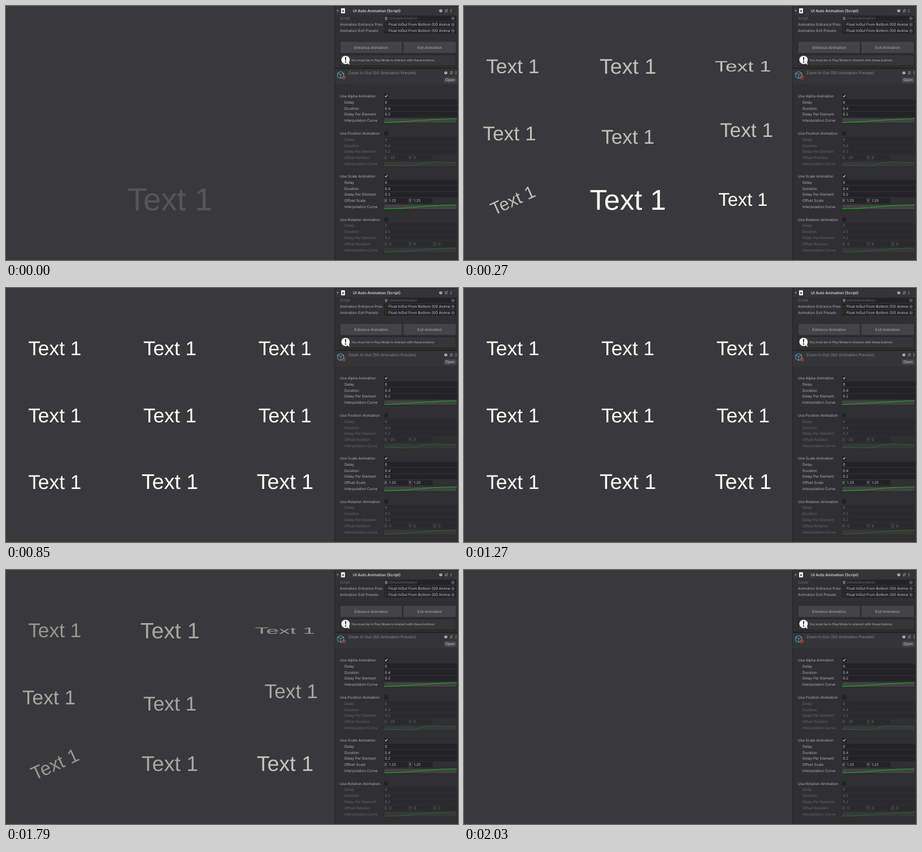
Write an HTML page that moves like this. It is 800 by 450 pixels and loops after 2.33 s.

```html
<!DOCTYPE html>
<html lang="en">
<head>
<meta charset="utf-8">
<title>UI Auto Animation</title>
<style>
  html, body { margin: 0; width: 100%; height: 100%; overflow: hidden; background: #39383a; }
  svg { display: block; width: 100%; height: 100%; }
  text { white-space: pre; text-rendering: geometricPrecision; }
  #panel text { font-family: Inter, sans-serif; font-size: 6.46px; fill: #b4b3b5; }
  #panel .dim { opacity: .42; }
  #stage text { font: 35.3px "Liberation Sans", Arial, sans-serif; fill: #fff; text-anchor: middle; }
</style>
</head>
<body>
<svg id="root" viewBox="0 0 800 450">
  <defs>
    <clipPath id="labelClip"><rect x="582" y="0" width="84.5" height="450"/></clipPath>
    <clipPath id="fieldClip"><rect x="669" y="0" width="117" height="450"/></clipPath>
  </defs>
  <rect width="800" height="450" fill="#39383a"/>
  <g id="stage"></g>
  <g id="panel"></g>
</svg>
<script>
const NS = 'http://www.w3.org/2000/svg';
const panel = document.getElementById('panel');
const stage = document.getElementById('stage');

function add(parent, tag, attrs, content) {
  const el = document.createElementNS(NS, tag);
  for (const k in attrs) el.setAttribute(k, attrs[k]);
  if (content !== undefined) el.textContent = content;
  return parent.appendChild(el);
}
const rect = (g, x, y, w, h, fill, more) =>
  add(g, 'rect', { x, y, width: w, height: h, fill, ...more });
const path = (g, d, stroke, width = 1, fill = 'none') =>
  add(g, 'path', { d, stroke, 'stroke-width': width, fill });
const label = (g, x, mid, str, style = '', more = {}) =>
  add(g, 'text', { x, y: mid + 2.3, style, ...more }, str);

// ---- Inspector panel ----
const PANEL = '#302f31', HEAD = '#353436', FIELD = '#232224', EDGE = '#1e1d1f';

function headerIcons(x, y) {
  add(panel, 'circle', { cx: x, cy: y, r: 2.6, fill: '#c4c3c5' });
  label(panel, x, y - .4, '?', 'font-size:5px;font-weight:700;fill:#333;text-anchor:middle');
  path(panel, `M${x + 7} ${y - 1.4}h5.4M${x + 7} ${y + 1.6}h5.4M${x + 11} ${y - 2.8}v2.8M${x + 8.6} ${y + .2}v2.8`, '#a4a3a5', .8);
  for (const d of [-2.2, 0, 2.2])
    add(panel, 'circle', { cx: x + 18, cy: y + d, r: .7, fill: '#c4c3c5' });
}

function objectRow(mid, name, value, dim) {
  const row = add(panel, 'g', {});
  rect(row, 669, mid - 4.6, 128, 9.2, FIELD, { rx: 1 });
  const ink = add(row, 'g', dim ? { opacity: .5 } : {});
  label(ink, 591, mid, name, '', { 'clip-path': 'url(#labelClip)' });
  label(ink, 677, mid, value, dim ? '' : 'fill:#d0cfd1', { 'clip-path': 'url(#fieldClip)' });
  if (dim) rect(ink, 670.5, mid - 3, 4.6, 6, '#b0afb1', { rx: .6 });
  else path(ink, `M671 ${mid - 1.5}l1.8 -1 1.8 1v2.4l-1.8 1-1.8 -1z`, '#454', .6);
  add(row, 'circle', { cx: 791, cy: mid, r: 2.5, fill: 'none', stroke: '#8a898b', 'stroke-width': .8 });
  add(row, 'circle', { cx: 791, cy: mid, r: 1, fill: '#8a898b' });
}

function button(x, y, w, h, str) {
  rect(panel, x, y, w, h, '#444345', { rx: 1, stroke: '#29282a', 'stroke-width': .6 });
  label(panel, x + w / 2, y + h / 2, str, 'text-anchor:middle');
}

function buildHeader() {
  rect(panel, 582, 0, 218, 450, PANEL);
  rect(panel, 582, 0, 218, 16, HEAD);
  rect(panel, 581, 0, 1.6, 450, '#272628');
  rect(panel, 582, 0, 218, .8, '#242325');
  path(panel, 'M584.8 7h4.4l-2.2 3.4z', 'none', 0, '#7b7a7c');
  rect(panel, 593, 4, 7, 9, '#eeedef', { rx: 1 });
  label(panel, 596.5, 8.4, '#', 'font-size:5.5px;font-weight:700;fill:#333;text-anchor:middle');
  label(panel, 614, 8.4, 'UI Auto Animation (Script)', 'font-size:6.7px;font-weight:600;fill:#d4d3d5');
  headerIcons(769.5, 8.3);

  objectRow(22, 'Script', 'UIAutoAnimation', true);
  objectRow(33, 'Animation Entrance Presets', 'Float InOut From Bottom (SO Animation Presets)');
  objectRow(44, 'Animation Exit Presets', 'Float InOut From Bottom (SO Animation Presets)');

  button(591.5, 63, 109.5, 20.5, 'Entrance Animation');
  button(703, 63, 93.5, 20.5, 'Exit Animation');

  rect(panel, 591.5, 86.3, 205, 19.8, '#363537', { rx: 1, stroke: EDGE, 'stroke-width': .8 });
  path(panel, 'M604 101l4 3.6 -1 -6z', 'none', 0, '#fff');
  add(panel, 'circle', { cx: 601, cy: 95.6, r: 7.4, fill: '#fff' });
  path(panel, 'M599.9 90.4h2.4l-.5 6.6h-1.4z', 'none', 0, '#2c2b2d');
  add(panel, 'circle', { cx: 601.1, cy: 99.3, r: 1.2, fill: '#2c2b2d' });
  label(panel, 611, 96, 'You must be in Play Mode to interact with these buttons', 'font-size:5.6px');

  rect(panel, 582, 109.6, 218, 2, '#1f1e20');
  rect(panel, 582, 111.6, 218, 27.4, HEAD);
  path(panel, 'M592.3 116.2l5.4 2.7v6.6l-5.4 2.9 -5.4 -2.9v-6.6zM586.9 118.9l5.4 2.7 5.4 -2.7M592.3 121.6v6.8', '#5ba9cf', 1);
  label(panel, 598, 126.6, '{}', 'font-size:7.5px;font-weight:700;fill:#d85a38;text-anchor:middle');
  label(panel, 605.7, 118.4, 'Zoom In Out (SO Animation Presets)', 'font-size:7.07px;fill:#8a898b');
  headerIcons(778.5, 118.3);
  rect(panel, 775, 126.5, 22, 9.4, '#484749', { rx: 1 });
  label(panel, 786, 131.1, 'Open', 'fill:#cccbcd;text-anchor:middle');
}

const STEP = 10.85;

// Curve shapes in a 129 by 9 box.
const CURVES = {
  ramp: 'M0 8.2C40 6.6 80 2.6 129 .8',
  dip: 'M0 6.6C22 7 30 8.2 46 8C64 7.4 66 1 86 .9C102 .9 112 1.6 129 2',
  ease: 'M0 8C48 7.8 78 .9 129 .9'
};

function section(top, name, on, delays, curve, vector) {
  label(panel, 591, top, `Use ${name} Animation`);
  rect(panel, 669.3, top - 3.8, 7.4, 7.6, FIELD, { rx: 1 });
  if (on) path(panel, `M670.8 ${top}l1.5 1.7 2.6 -3.6`, '#dddcde', 1.1);

  const body = add(panel, 'g', on ? {} : { class: 'dim' });
  let mid = top + STEP;
  const fieldNames = ['Delay', 'Duration', 'Delay Per Element'];
  fieldNames.forEach((str, i) => {
    label(body, 599, mid, str);
    rect(body, 669, mid - 4.6, 130, 9.3, FIELD, { rx: 1 });
    label(body, 670.5, mid, delays[i], 'fill:#c4c3c5');
    mid += STEP;
  });
  if (vector) {
    label(body, 599, mid, `Offset ${name}`);
    vector.forEach((v, i) => {
      const x = 669.5 + i * 43.5;
      label(body, x, mid, 'XYZ'[i]);
      rect(body, x + 7, mid - 4.6, 35, 9.3, FIELD, { rx: 1 });
      label(body, x + 8.5, mid, v, 'fill:#c4c3c5');
    });
    mid += STEP;
  }
  label(body, 599, mid, 'Interpolation Curve');
  const box = add(body, 'g', { transform: `translate(669 ${mid - 4.4})` });
  rect(box, 0, 0, 129, 9, '#434244', { stroke: EDGE, 'stroke-width': .6 });
  path(box, CURVES[curve], '#16b819', 1);
}

buildHeader();
section(159.5, 'Alpha', true, ['0', '0.4', '0.2'], 'ramp');
section(225.5, 'Position', false, ['0', '0.4', '0.2'], 'dip', ['-25', '0']);
section(301.5, 'Scale', true, ['0', '0.4', '0.2'], 'ease', ['1.25', '1.25']);
section(378.2, 'Rotation', false, ['0', '0.5', '0.2'], 'ease', ['0', '0', '0']);

// ---- Animated texts ----
const LOOP = 2330;
const clamp = v => Math.min(1, Math.max(0, v));
const ramp = (t, start, dur) => clamp((t - start) / dur);
const ease = u => u * u * (3 - 2 * u);

// Pose offsets: x, y shift; w, h added scale; a angle in degrees.
const still = {};
const zoom = { w: .27, h: .27 };
const flip = { w: .25, h: -1 };
const EARLY = [1580, 400], LATE = [1625, 375], LAST = [1690, 335];

function cell(col, row, from, to, exit, more) {
  const el = add(stage, 'text', { y: 12.2 }, 'Text 1');
  return {
    el, from, to, exit,
    cx: 86.3 + col * 203.8, cy: [107, 226, 344][row],
    fade: [20, 370], move: 400, size: 1, ...more
  };
}

const cells = [
  cell(0, 0, still, still, EARLY),
  cell(1, 0, zoom, zoom, LATE),
  cell(2, 0, flip, flip, EARLY),
  cell(0, 1, { x: -24 }, { x: -25 }, LATE),
  cell(1, 1, { y: 23.5 }, { y: 27 }, LATE),
  cell(2, 1, { x: 25, y: -25 }, { x: 26, y: -26 }, LATE),
  cell(0, 2, { a: -56, w: -.27, h: -.27 }, { a: -45, w: -.1, h: -.1 }, EARLY, { move: 500 }),
  cell(1, 2, { w: .5, h: .5 }, still, LATE, { fade: [-28, 200], move: 740, size: 1.065, cy: 343 }),
  cell(2, 2, { w: -.3, h: -.3 }, still, LAST, { fade: [20, 200], move: 500, size: 1.065, cy: 343 })
];

function draw(t) {
  for (const c of cells) {
    const out = ramp(t, ...c.exit);
    const left = 1 - ease(ramp(t, 0, c.move)), gone = ease(out);
    const mix = k => (c.from[k] || 0) * left + (c.to[k] || 0) * gone;
    const sx = c.size * (1 + mix('w')), sy = c.size * (1 + mix('h'));
    c.el.setAttribute('transform',
      `translate(${c.cx + mix('x')} ${c.cy + mix('y')}) rotate(${mix('a')}) scale(${sx} ${sy})`);
    c.el.setAttribute('opacity', Math.min(ramp(t, ...c.fade), 1 - out));
  }
}

const begin = performance.now();
function tick() {
  draw((performance.now() - begin) % LOOP);
  requestAnimationFrame(tick);
}
tick();
</script>
</body>
</html>
```
